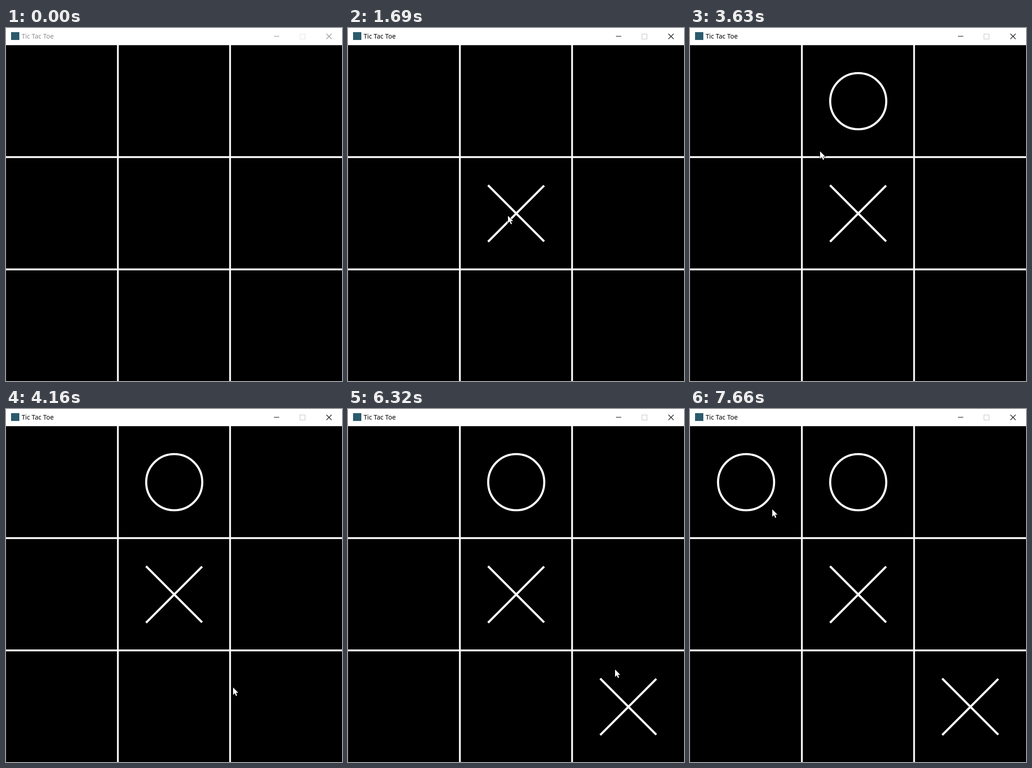
Animation of 731x767 px, one loop 8 s. Source, as an HTML page:

```html
<!DOCTYPE html>
<html lang="en">
<head>
<meta charset="utf-8">
<title>Tic Tac Toe</title>
<style>
  html, body { margin: 0; width: 100%; height: 100%; overflow: hidden; background: #000; }
  svg { display: block; width: 100%; height: 100%; }
  text { font: 14px "Noto Sans", "Open Sans", sans-serif; }
  .thin { fill: none; stroke: currentColor; stroke-width: 1.1; }
  .mark { fill: none; stroke: #fff; stroke-width: 4.6; }
  #cursor { fill: #fff; stroke: #000; stroke-width: 1.4; paint-order: stroke; }
</style>
</head>
<body>
<svg viewBox="0 0 731 767">
  <rect width="731" height="37.3" fill="#fff"/>
  <rect x="11" y="9" width="18" height="17" fill="#2c5a6c"/>
  <g id="titlebar">
    <text x="34" y="23" fill="currentColor">Tic Tac Toe</text>
    <path class="thin" d="M583 18H594.5"/>
    <path class="thin" d="M697 12.5L708.5 24M708.5 12.5L697 24"/>
  </g>
  <rect id="maximise" class="thin" x="639.5" y="13" width="11" height="11"/>

  <path d="M.5 38V767" stroke="#1c1c1c"/>
  <path d="M243.4 37V767M487.5 37V767M0 280.5H731M0 524.5H731" stroke="#fff" stroke-width="3.8"/>
  <g id="marks"></g>
  <path id="cursor" d="M0 0V16L3.8 12.5L6.3 18.4L8.7 17.4L6.3 11.6H11.3Z"/>
</svg>
<script>
const LOOP = 8000;
const ACTIVATE = 910;
const CELL = 244;
const SAMPLE = 77;

const moves = [
  { at: 990, shape: 'x', col: 1, row: 1 },
  { at: 2550, shape: 'o', col: 1, row: 0 },
  { at: 5640, shape: 'x', col: 2, row: 2 },
  { at: 7660, shape: 'o', col: 0, row: 0 },
];

// Pointer strokes: each follows a Bézier curve through its control points.
const strokes = [
  { start: 370, end: 840, curve: [[560, 676], [420, 470], [356, 430]] },
  { start: 1690, end: 2320, curve: [[348, 408], [300, 300], [262, 210], [296, 197]] },
  { start: 3160, end: 3240, curve: [[322, 209], [352, 228]] },
  { start: 3550, end: 4160, curve: [[334, 236], [175, 290], [190, 620], [494, 605]] },
  { start: 4240, end: 5160, curve: [[400, 510], [200, 155], [107, 500], [335, 566]] },
  { start: 5240, end: 5470, curve: [[410, 581], [570, 622], [624, 623]] },
  { start: 6320, end: 6950, curve: [[581, 566], [330, 262], [179, 218]] },
];

const lerp = (a, b, t) => a + (b - a) * t;

function bezier(points, t) {
  if (points.length === 1) return points[0];
  const inner = points.slice(1).map(([x, y], i) =>
    [lerp(points[i][0], x, t), lerp(points[i][1], y, t)]);
  return bezier(inner, t);
}

// The pointer is sampled at a steady rate and holds still between samples.
function pointerAt(time) {
  const stroke = strokes.findLast(s => time >= s.start);
  if (!stroke) return null;
  const { start, end, curve } = stroke;
  const count = Math.round((end - start) / SAMPLE);
  const progress = Math.min(1, (time - start) / (end - start));
  return bezier(curve, Math.floor(progress * count + 0.05) / count);
}

const $ = id => document.getElementById(id);
const titlebar = $('titlebar'), maximise = $('maximise'), cursor = $('cursor');

function addMark({ shape, col, row }) {
  const path = document.createElementNS('http://www.w3.org/2000/svg', 'path');
  path.setAttribute('class', 'mark');
  path.setAttribute('transform', `translate(${122 + col * CELL} ${159 + row * CELL})`);
  path.setAttribute('d', shape === 'x'
    ? 'M-61.3 -61.3L60.7 60.7M60.7 -60.7L-61.3 61.3'
    : 'M-61 0a61 61 0 1 1 122 0a61 61 0 1 1 -122 0');
  $('marks').append(path);
  return path;
}
const marks = moves.map(addMark);

const show = (node, on) => { node.style.visibility = on ? 'visible' : 'hidden'; };

function draw(time) {
  const active = time >= ACTIVATE;
  titlebar.style.color = active ? '#000' : '#8c8c8c';
  maximise.style.color = active ? '#c4c4c4' : '#e4e4e4';
  marks.forEach((mark, i) => show(mark, time >= moves[i].at));

  const point = pointerAt(time);
  show(cursor, point);
  if (point) cursor.setAttribute('transform', `translate(${point.map(Math.round)})`);
}

const origin = performance.now();
function tick() {
  draw((performance.now() - origin) % LOOP);
  requestAnimationFrame(tick);
}
tick();
</script>
</body>
</html>
```
